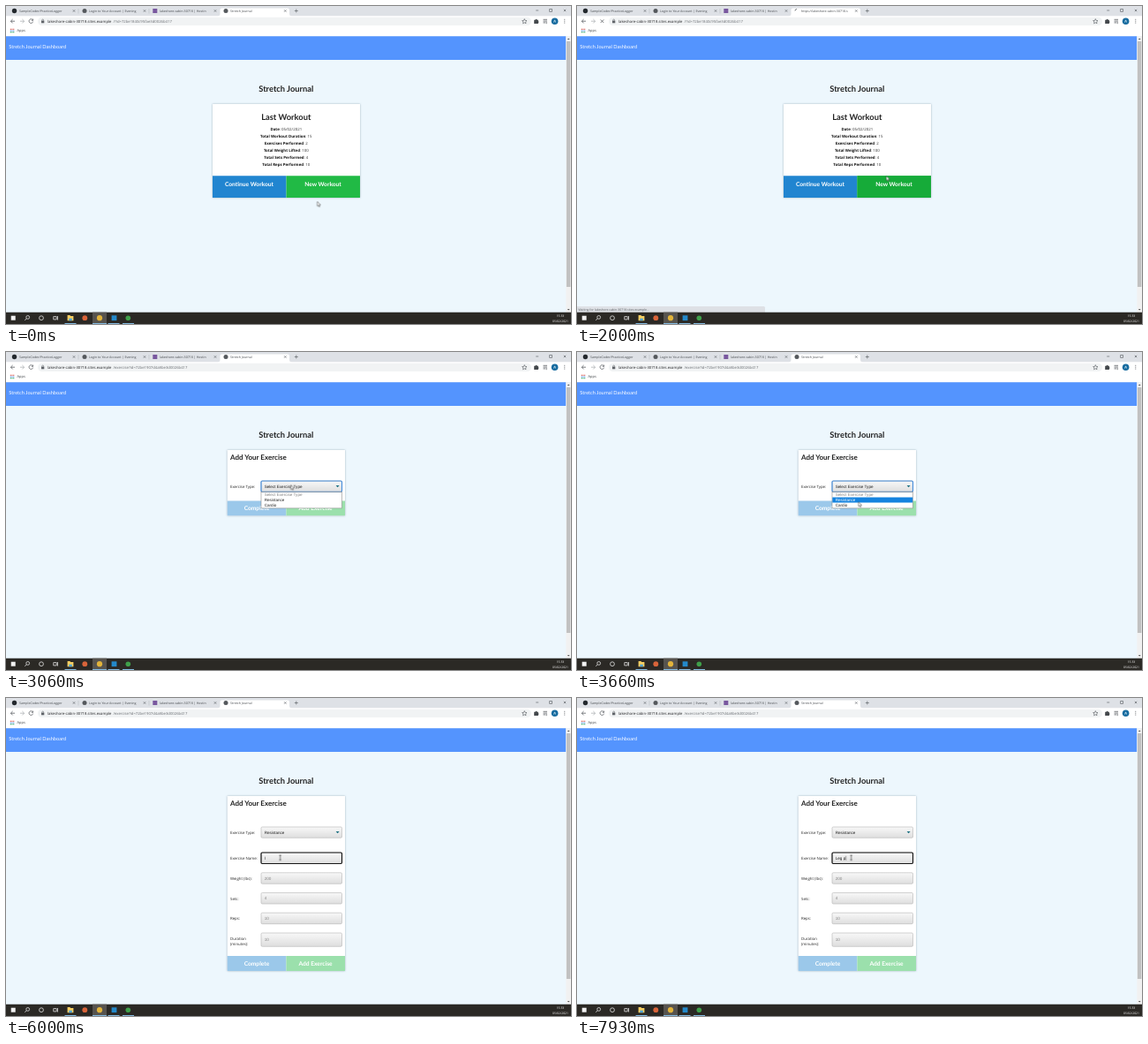
Write an HTML page that moves like this. It is 640 by 360 pixels and loops after 8 s.

```html
<!DOCTYPE html>
<html lang="en">
<head>
<meta charset="utf-8">
<title>Stretch Journal</title>
<style>
html, body { margin: 0; width: 100%; height: 100%; overflow: hidden; }
svg { display: block; width: 100vw; height: 100vh; }
text { font-family: "Open Sans", sans-serif; text-rendering: geometricPrecision; white-space: pre; }
.tab { font-size: 3.6px; fill: #45494d; }
.url { font-size: 4.23px; fill: #6a6e73; }
.url tspan { fill: #202124; }
.status { font-size: 3.45px; fill: #55595d; }
.clock { font-size: 3.4px; fill: #fff; text-anchor: middle; }
.brand { font: 5.6px Lato, sans-serif; fill: #fff; }
.h1, .h2, .button { font-family: Lato, sans-serif; font-weight: 700; }
.h1 { font-size: 9.33px; text-anchor: middle; fill: #222; }
.h2 { font-size: 8px; fill: #222; }
.button { font-size: 6.67px; text-anchor: middle; fill: #fff; }
.fact { font-size: 4.36px; text-anchor: middle; fill: #333; }
.fact tspan { font-weight: 700; fill: #111; }
.label { font-size: 4.33px; fill: #222; }
.control { font: 4.6px "Liberation Sans", Arial, sans-serif; fill: #222; }
.hint { fill: #858585; }
.field { fill: url(#bevel); stroke: #b4b4b4; stroke-width: .6; }
.line { fill: none; stroke: #50545a; stroke-width: .75; }
.card { fill: #fff; filter: drop-shadow(0 .4px .9px rgba(30, 60, 80, .38)); }

/* One percent of the loop is 80 ms. */
[class^="show-"] { visibility: hidden; animation: 8s step-end infinite; }
.show-home { animation-name: home; }
.show-hover { animation-name: hover; }
.show-link { animation-name: link; }
.show-loading { animation-name: loading; }
.show-idle { animation-name: idle; }
.show-form { animation-name: form; }
.show-short { animation-name: short; }
.show-long { animation-name: long; }
.show-popup { animation-name: popup; }
.show-option { animation-name: option; }
.show-plain { animation-name: plain; }
.show-ring { animation-name: ring; }
.show-focus { animation-name: focus; }
.show-hint { animation-name: hint; }
.show-slip { animation-name: slip; }
.show-key1 { animation-name: key1; }
.show-key2 { animation-name: key2; }
.show-key3 { animation-name: key3; }
.show-key4 { animation-name: key4; }
.show-caret { animation-name: caret; }
.show-arrow { animation-name: arrow; }
.show-hand { animation-name: hand; }
.show-beam { animation-name: beam; }
@keyframes home { 0% { visibility: visible } 25.75%, 100% { visibility: hidden } }
@keyframes hover { 0% { visibility: hidden } 4.1% { visibility: visible } 25.75%, 100% { visibility: hidden } }
@keyframes link { 0% { visibility: hidden } 4.1% { visibility: visible } 21.6%, 100% { visibility: hidden } }
@keyframes loading { 0% { visibility: hidden } 21.6% { visibility: visible } 33.2%, 100% { visibility: hidden } }
@keyframes idle { 0% { visibility: visible } 21.6% { visibility: hidden } 33.2%, 100% { visibility: visible } }
@keyframes form { 0% { visibility: hidden } 25.75%, 100% { visibility: visible } }
@keyframes short { 0% { visibility: hidden } 25.75% { visibility: visible } 48.25%, 100% { visibility: hidden } }
@keyframes long { 0% { visibility: hidden } 48.25%, 100% { visibility: visible } }
@keyframes popup { 0% { visibility: hidden } 36.6% { visibility: visible } 48.25%, 100% { visibility: hidden } }
@keyframes option { 0% { visibility: hidden } 42% { visibility: visible } 48.25%, 100% { visibility: hidden } }
@keyframes plain { 0% { visibility: hidden } 36.6% { visibility: visible } 42%, 100% { visibility: hidden } }
@keyframes ring { 0% { visibility: hidden } 36.6% { visibility: visible } 65.75%, 100% { visibility: hidden } }
@keyframes focus { 0% { visibility: hidden } 65.75%, 100% { visibility: visible } }
@keyframes hint { 0% { visibility: hidden } 48.25% { visibility: visible } 75%, 100% { visibility: hidden } }
@keyframes slip { 0% { visibility: hidden } 75% { visibility: visible } 78.25%, 100% { visibility: hidden } }
@keyframes key1 { 0% { visibility: hidden } 78.25%, 100% { visibility: visible } }
@keyframes key2 { 0% { visibility: hidden } 83.25%, 100% { visibility: visible } }
@keyframes key3 { 0% { visibility: hidden } 86.6%, 100% { visibility: visible } }
@keyframes key4 { 0% { visibility: hidden } 97.5%, 100% { visibility: visible } }
@keyframes caret {
  0% { visibility: hidden }
  65.75% { visibility: visible; transform: translateX(0) }
  75% { visibility: hidden }
  78.25% { visibility: visible; transform: translateX(2.7px) }
  83.25% { visibility: visible; transform: translateX(5.3px) }
  86.6% { visibility: visible; transform: translateX(7.8px) }
  91.6% { visibility: visible; transform: translateX(9.1px) }
  97.5%, 100% { visibility: visible; transform: translateX(11.8px) }
}
@keyframes arrow { 0% { visibility: visible } 4.1% { visibility: hidden } 23.5% { visibility: visible } 57.5%, 100% { visibility: hidden } }
@keyframes hand { 0% { visibility: hidden } 4.1% { visibility: visible } 23.5%, 100% { visibility: hidden } }
@keyframes beam { 0% { visibility: hidden } 57.5%, 100% { visibility: visible } }
#pointer { animation: travel 8s ease-in-out infinite; }
@keyframes travel {
  0%, .75% { transform: translate(352.6px, 221.4px) }
  6.6%, 21.6% { transform: translate(359.3px, 206.4px) }
  31.6%, 36.6% { transform: translate(322.8px, 149px) }
  45.75%, 52.5% { transform: translate(318.8px, 169.6px) }
  55%, 57.5% { transform: translate(316px, 174px) }
  63.25%, 100% { transform: translate(310.6px, 180.6px) }
}
</style>
</head>
<body>
<svg viewBox="0 0 640 360" preserveAspectRatio="none">
  <defs>
    <linearGradient id="bevel" x2="0" y2="1">
      <stop stop-color="#f8f8f8"/><stop offset="1" stop-color="#dedede"/>
    </linearGradient>
    <clipPath id="tabClip"><path d="M254 0h57v11h-57z"/></clipPath>
    <path id="close" d="M-1.2-1.2l2.4 2.4m0-2.4l-2.4 2.4"/>
  </defs>

  <!-- Browser tabs -->
  <path fill="#dee1e6" d="M0 0h640v12H0z"/>
  <path fill="#fff" d="M0 11.3h640v23H0zM240 11.3q2.5 0 2.5-2.5V4.5q0-2 2-2h74.5q2 0 2 2v4.3q0 2.5 2.5 2.5z"/>
  <path class="line" stroke="#9a9da1" style="stroke:#a5a8ad;stroke-width:.4" d="M82 3v5.500M162 3v5.500"/>
  <circle cx="9.500" cy="5.500" r="2.700" fill="#24292e"/>
  <circle cx="89" cy="5.500" r="2.500" fill="#55595d"/>
  <rect x="166.300" y="3" width="5" height="5" fill="#79589f"/>
  <text class="tab" x="15" y="6.800">SampleCoder/PracticeLogger</text>
  <text class="tab" x="94" y="6.800">Login to Your Account | Evening</text>
  <text class="tab" x="174" y="6.800">lakeshore-cabin-30718 | Hostin</text>
  <g class="show-idle">
    <circle cx="249" cy="5.500" r="2.500" fill="#55595d"/>
    <text class="tab" x="254" y="6.800">Stretch Journal</text>
    <path class="line" d="M30.200 15.700a2.300 2.300 0 1 0 .4 2M30.600 14.600v1.700h-1.700"/>
  </g>
  <g class="show-loading">
    <path class="line" d="M247 5.500a2 2 0 0 1 2-2"/>
    <text class="tab" x="254" y="6.800" clip-path="url(#tabClip)">https://lakeshore-cabin-30718.s</text>
    <path class="line" d="M26.700 15.400l3.600 3.600m0-3.600l-3.600 3.600"/>
  </g>
  <g class="line" style="stroke-width:.6">
    <use href="#close" x="77" y="5.500"/><use href="#close" x="157" y="5.500"/>
    <use href="#close" x="237" y="5.500"/><use href="#close" x="316.300" y="5.500"/>
    <use href="#close" x="633" y="5"/>
    <path d="M326.800 5.500h4m-2-2v4M600.200 5h3M615.600 3.500h2.900v2.900h-2.900z"/>
  </g>

  <!-- Toolbar -->
  <rect x="36" y="12.700" width="559" height="9.300" rx="4.600" fill="#f1f3f4"/>
  <path class="line" d="M10 17.200H5.400m2.200-2.200l-2.200 2.200 2.200 2.200"/>
  <path class="line" style="stroke:#a9acb0" d="M16 17.200h4.600m-2.200-2.200l2.200 2.200-2.200 2.200"/>
  <path fill="#5f6368" d="M40 16.600h3.300v2.700H40z"/>
  <path class="line" style="stroke-width:.5" d="M40.700 16.700v-.7a.95.95 0 0 1 1.900 0v.7"/>
  <text class="url show" x="47" y="18.800"><tspan>lakeshore-cabin-30718.sites.example</tspan></text>
  <g class="show-home"><text class="url" x="121.500" y="18.800">/?id=72be1840c95fae3d0026b417</text></g>
  <g class="show-form"><text class="url" x="121.500" y="18.800">/exercise?id=72be1907d4a8be3d0026b417</text></g>
  <path class="line" style="stroke-width:.6" d="M587.300 14.600l.8 1.800 1.900.2-1.400 1.300.4 1.900-1.700-1-1.700 1 .4-1.900-1.400-1.300 1.900-.2z"/>
  <path fill="#44484c" d="M598.200 15.700h1.500a.9.9 0 0 1 1.800 0h1.400v1.500a.9.9 0 0 1 0 1.700v1.200h-4.700z"/>
  <path class="line" d="M608.500 15.300h4.500m-4.500 1.800h4.500m-4.500 1.800h2.500m1.200-.9v2.200"/>
  <circle cx="621.600" cy="17.200" r="3.800" fill="#176b9f"/>
  <path class="line" style="stroke:#d9edf6" d="M620.600 18.500l1-2.600 1 2.600"/>
  <path class="line" style="stroke-width:1;stroke-linecap:round" stroke-dasharray="0 1.900" d="M632.800 15.300v4"/>
  <g fill="none" stroke-width="1.100" stroke-dasharray="1.100 .6">
    <path stroke="#db4437" d="M4.800 26.300h4.500"/><path stroke="#4285f4" d="M4.800 28h4.500"/><path stroke="#0f9d58" d="M4.800 29.700h4.500"/>
  </g>
  <text class="tab" x="12.500" y="29.400" style="font-size:4px">Apps</text>

  <!-- Page -->
  <path fill="#edf7fd" d="M0 34.300h640v312.700H0z"/>
  <path fill="#5494fe" d="M0 34.300h634.300v26.700H0z"/>
  <text class="brand" x="3.300" y="48.400">Stretch Journal Dashboard</text>
  <path fill="#f1f1f1" d="M634.300 34.300h5.700v312.700h-5.700z"/>
  <path fill="#c1c1c1" d="M634.900 40h4.500v278h-4.500z"/>
  <path fill="#555" d="M635.800 38l1.400-1.600 1.400 1.600zM635.800 343l1.400 1.600 1.400-1.600z"/>
  <text class="h1" x="317.300" y="97.300">Stretch Journal</text>

  <g class="show-home">
    <rect class="card" x="234" y="111" width="167" height="106"/>
    <text class="h1" x="317.300" y="128.900">Last Workout</text>
    <text class="fact" x="317.300" y="141"><tspan>Date</tspan>: 05/02/2021</text>
    <text class="fact" x="317.300" y="149"><tspan>Total Workout Duration</tspan>: 15</text>
    <text class="fact" x="317.300" y="157"><tspan>Exercises Performed</tspan>: 2</text>
    <text class="fact" x="317.300" y="165"><tspan>Total Weight Lifted</tspan>: 100</text>
    <text class="fact" x="317.300" y="173"><tspan>Total Sets Performed</tspan>: 4</text>
    <text class="fact" x="317.300" y="181"><tspan>Total Reps Performed</tspan>: 10</text>
    <path fill="#2185d0" d="M234 192.300h83.500v24.700H234z"/>
    <path fill="#21ba45" d="M317.500 192.300H401v24.700h-83.500z"/>
    <path class="show-hover" fill="#16ab39" d="M317.500 192.300H401v24.700h-83.500z"/>
    <text class="button" x="275.500" y="203.800">Continue Workout</text>
    <text class="button" x="359" y="203.800">New Workout</text>
  </g>

  <g class="show-short">
    <rect class="card" x="250.700" y="111" width="133.300" height="74.300"/>
    <path fill="#9bc8ea" d="M250.700 168.500h66.700v16.800h-66.700z"/>
    <path fill="#9be0ac" d="M317.400 168.500H384v16.800h-66.600z"/>
    <text class="button" x="284" y="179.400">Complete</text>
    <text class="button" x="350.600" y="179.400">Add Exercise</text>
  </g>
  <g class="show-long">
    <rect class="card" x="250.700" y="111" width="133.300" height="198"/>
    <path fill="#9bc8ea" d="M250.700 292h66.700v17h-66.700z"/>
    <path fill="#9be0ac" d="M317.400 292H384v17h-66.600z"/>
    <text class="button" x="284" y="302.900">Complete</text>
    <text class="button" x="350.600" y="302.900">Add Exercise</text>
    <text class="label" x="254" y="183.200">Exercise Name:</text>
    <text class="label" x="254" y="205.800">Weight (lbs):</text>
    <text class="label" x="254" y="228.600">Sets:</text>
    <text class="label" x="254" y="251.200">Reps:</text>
    <text class="label" x="254" y="273.900">Duration</text>
    <text class="label" x="254" y="280.300">(minutes):</text>
    <rect class="field" x="289" y="175" width="91.500" height="12.500" rx="1.300"/>
    <rect class="field" x="289" y="197.800" width="91.500" height="12.500" rx="1.300"/>
    <rect class="field" x="289" y="220.500" width="91.500" height="12.500" rx="1.300"/>
    <rect class="field" x="289" y="243.200" width="91.500" height="12.500" rx="1.300"/>
    <rect class="field" x="289" y="266" width="91.500" height="15.300" rx="1.300"/>
    <text class="control hint" x="292.700" y="205.700">200</text>
    <text class="control hint" x="292.700" y="228.400">4</text>
    <text class="control hint" x="292.700" y="251.100">10</text>
    <text class="control hint" x="292.700" y="275.300">10</text>
  </g>
  <g class="show-form">
    <text class="h2" x="254" y="122.300">Add Your Exercise</text>
    <text class="label" x="254" y="154.200">Exercise Type:</text>
    <rect class="field" x="289" y="146" width="91.500" height="12.300" rx="1.300"/>
    <path fill="#1b6f80" d="M373.600 151.100h4l-2 2.200z"/>
  </g>
  <g class="show-short"><text class="control" x="292.700" y="153.700">Select Exercise Type</text></g>
  <g class="show-long"><text class="control" x="292.700" y="153.700">Resistance</text></g>
  <rect class="show-ring" x="289" y="146" width="91.500" height="12.300" rx="1.300" fill="none" stroke="#4a90dc" stroke-width="1.200"/>

  <g class="show-popup">
    <rect x="289" y="158.600" width="91.500" height="18.300" fill="#fff" stroke="#777" stroke-width=".5"/>
    <path class="show-option" fill="#1583df" d="M289.300 164.600h90.900v6h-90.900z"/>
    <text class="control hint" x="292.700" y="162.900">Select Exercise Type</text>
    <text class="control" x="292.700" y="175.100">Cardio</text>
  </g>
  <g class="show-plain"><text class="control" x="292.700" y="169.100">Resistance</text></g>
  <g class="show-option"><text class="control" x="292.700" y="169.100" style="fill:#fff">Resistance</text></g>

  <!-- Exercise name typing -->
  <g class="show-hint"><text class="control hint" x="292.700" y="182.800">Bench Press</text></g>
  <rect class="show-focus" x="289" y="175" width="91.500" height="12.500" rx="1.200" fill="none" stroke="#161616" stroke-width="1.200"/>
  <g class="show-slip"><text class="control" x="292.900" y="182.800">l</text></g>
  <text class="control" x="292.700" y="182.800"><tspan class="show-key1">L</tspan><tspan class="show-key2">e</tspan><tspan class="show-key3">g</tspan><tspan class="show-key4"> p</tspan></text>
  <path class="show-caret" fill="#111" d="M292.700 178.700h.4v5.200h-.4z"/>

  <!-- Status bubble -->
  <g class="show-link">
    <path fill="#dee1e6" d="M0 340h100q1.500 0 1.500 1.500v5.500H0z"/>
    <text class="status" x="1.500" y="344.700">https://lakeshore-cabin-30718.sites.example/exercise</text>
  </g>
  <g class="show-loading">
    <path fill="#dee1e6" d="M0 340h211.500q1.500 0 1.500 1.500v5.500H0z"/>
    <text class="status" x="1.500" y="344.700">Waiting for lakeshore-cabin-30718.sites.example...</text>
  </g>

  <!-- Taskbar -->
  <path fill="#2b2925" d="M0 346.700h640V360H0z"/>
  <path fill="#57544f" d="M98 346.700h16V360H98z"/>
  <path fill="#f2f2f2" d="M5.700 350.700h5v5h-5z"/>
  <g class="line" style="stroke:#eee">
    <circle cx="24.700" cy="352.400" r="1.900"/><path d="M23.300 353.800l-2 2"/>
    <circle cx="40" cy="353.200" r="2.400"/>
    <path d="M53.800 351.600h3.400v3.300h-3.400zM58.500 351v4.500"/>
  </g>
  <path fill="#f6cf62" d="M69.600 350h2.800l.8 1h3.200v5.200h-6.800z"/>
  <path fill="#4da3d8" d="M71.300 353.700h3.500v2.500h-3.500z"/>
  <circle cx="89.300" cy="353.200" r="2.900" fill="#d9643a"/>
  <circle cx="106" cy="353.200" r="3.100" fill="#e2b43b"/>
  <rect x="119.600" y="350.300" width="5.800" height="5.800" fill="#2489ca"/>
  <circle cx="138.300" cy="353.200" r="2.800" fill="#3fa04b"/>
  <path fill="#83b9df" d="M66.500 359h13v1h-13zM98 359h16v1H98zM115.500 359h13v1h-13zM132 359h13v1h-13z"/>
  <text class="clock" x="628" y="351.600">15:33</text>
  <text class="clock" x="628" y="357.700">05/02/2021</text>

  <g id="pointer" stroke="#222" stroke-width=".45" fill="#fff" stroke-linejoin="round">
    <path class="show-arrow" d="M0 0v5.200l1.200-1.100.8 1.900.9-.4-.8-1.800h1.700z"/>
    <path class="show-hand" d="M-.6.5q.6-.9 1.200 0v2.300l2.200.5q.6.2.5.900l-.5 2.600h-3.300l-1.800-2.500q.3-.8 1.700.1z"/>
    <path class="show-beam" fill="none" stroke-width=".6" d="M-1.200-2.600h2.400M-1.200 2.800h2.400M0-2.600v5.400"/>
  </g>
</svg>
</body>
</html>
```
